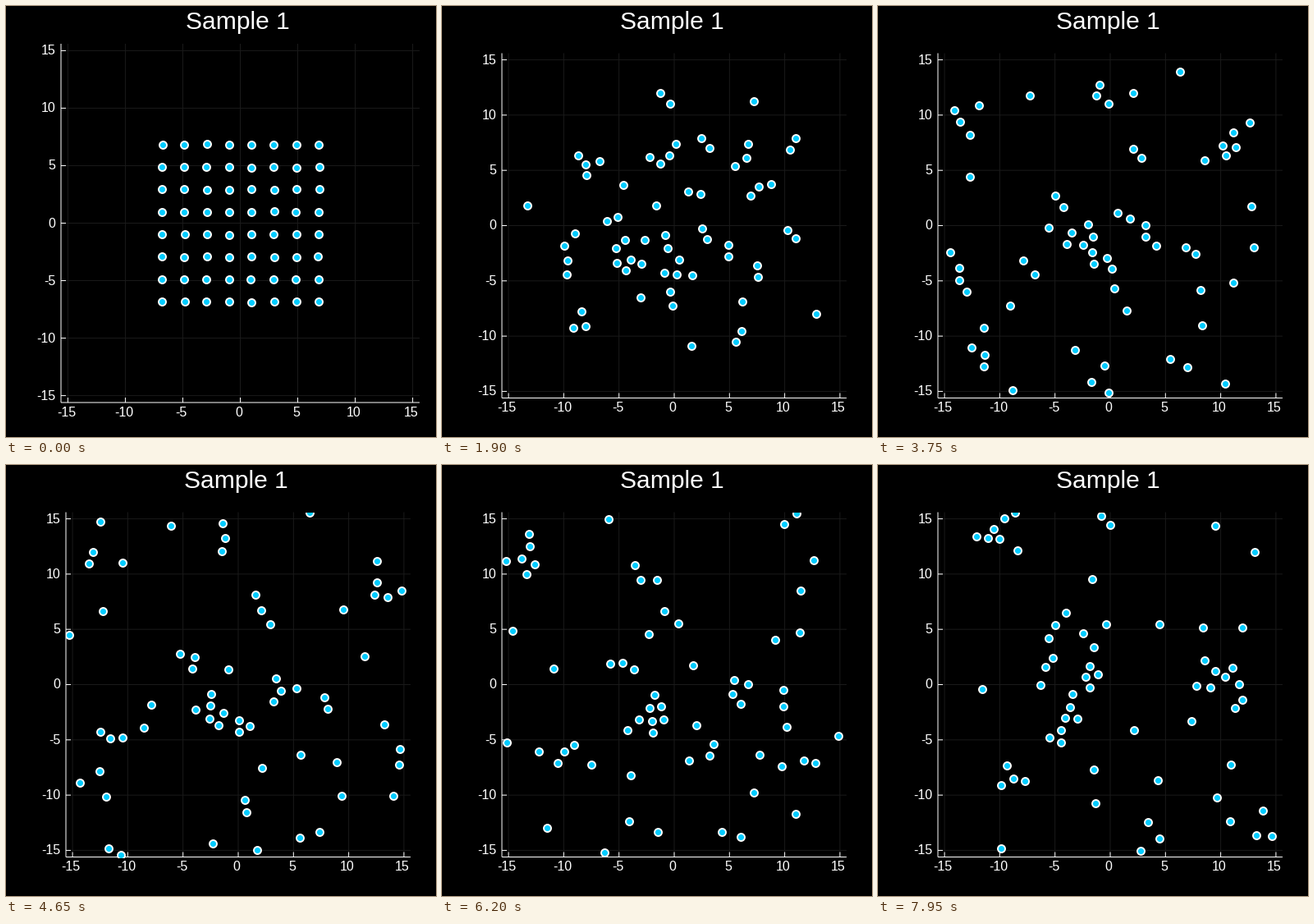
These frames come from a looping animation (524 px wide and 525 px high, 8000 ms). A matplotlib script:

```python
import numpy as np
import matplotlib.pyplot as plt
from matplotlib.animation import FuncAnimation
from matplotlib.patches import Rectangle

W, H, DPI = 524, 525, 100
PX = 72 / DPI
FRAMES, INTERVAL = 160, 50

# Lennard-Jones gas in reduced units, in a periodic box
N_SIDE = 8
SPACING = 1.95
BOX = 2 * N_SIDE * SPACING
HALF = BOX / 2
JITTER = 0.025
SPEED = 0.45
PACE = 4.0              # reduced time per second
SUBSTEPS = 20
SEED = 11


def lattice():
    k = (np.arange(N_SIDE) - (N_SIDE - 1) / 2) * SPACING
    gx, gy = np.meshgrid(k, k)
    return np.column_stack([gx.ravel(), gy.ravel()])


def forces(p):
    d = p[:, None] - p[None]
    d -= BOX * np.round(d / BOX)
    r2 = (d ** 2).sum(axis=2)
    np.fill_diagonal(r2, np.inf)
    inv6 = r2 ** -3
    pull = 24 * (2 * inv6 ** 2 - inv6) / r2
    return (d * pull[..., None]).sum(axis=1)


def simulate():
    """Velocity Verlet; returns the positions at every frame."""
    rng = np.random.default_rng(SEED)
    p = lattice()
    p += rng.normal(0, JITTER, p.shape)
    v = rng.normal(0, SPEED, p.shape)
    v -= v.mean(axis=0)
    dt = PACE * INTERVAL / 1000 / SUBSTEPS
    f = forces(p)
    path = [p.copy()]
    for _ in range(FRAMES - 1):
        for _ in range(SUBSTEPS):
            v += f * dt / 2
            p += v * dt
            f = forces(p)
            v += f * dt / 2
        path.append((p + HALF) % BOX - HALF)
    return path


PATH = simulate()

fig = plt.figure(figsize=(W / DPI, H / DPI), dpi=DPI, facecolor="black")
ax = fig.add_axes([0, 0, 1, 1])
ax.set_xlim(-0.5, W - 0.5)
ax.set_ylim(H - 0.5, -0.5)
ax.axis("off")


class View:
    """Grid, axes and labels of one plot area, measured in pixels."""

    def __init__(self, x0, y0, side, title_x):
        self.x0, self.y1 = x0, y0 + side
        self.scale = side / BOX
        self.clip = Rectangle((x0, y0), side, side, transform=ax.transData)
        self.parts = []
        x1, y1 = x0 + side, y0 + side
        self.text(title_x, 28, "Sample 1", 30, "center")
        for v in range(-15, 16, 5):
            x, y = self.to_px(np.array([v, v]))
            self.line([x, x], [y0, y1], "#1a1a1a", 1)
            self.line([x0, x1], [y, y], "#1a1a1a", 1)
            self.line([x, x], [y1 - 6, y1], "white", 2)
            self.line([x0, x0 + 6], [y, y], "white", 2)
            self.text(x - 1.8, y1 + 17, str(v), 16, "center")
            self.text(x0 - 6.5, y + 5, str(v), 16, "right")
        self.line([x0, x0], [y0, y1], "white", 2)
        self.line([x0, x1], [y1, y1], "white", 2)

    def to_px(self, p):
        x = self.x0 + (p[..., 0] + HALF) * self.scale
        y = self.y1 - (p[..., 1] + HALF) * self.scale
        return np.stack([x, y], axis=-1)

    def line(self, xs, ys, color, z):
        self.parts += ax.plot(xs, ys, color=color, lw=PX, zorder=z,
                              solid_capstyle="butt", snap=False)

    def text(self, x, y, s, size, ha):
        self.parts.append(ax.text(x, y, s, color="white", fontsize=size * PX,
                                  ha=ha, va="baseline",
                                  family="Liberation Sans"))

    def show(self, on):
        for part in self.parts:
            part.set_visible(on)


# The plot area shrinks a little right after the opening frame.
opening = View(66.5, 45.5, 437, 282)
steady = View(72.5, 57, 420, 280)
dots = ax.scatter([], [], s=(9 * PX) ** 2, c="#00ccff", edgecolors="white",
                  linewidths=1.9 * PX, zorder=3)


def draw(n):
    view = opening if n == 0 else steady
    opening.show(n == 0)
    steady.show(n > 0)
    dots.set_offsets(view.to_px(PATH[n]))
    dots.set_clip_path(view.clip)
    return [dots]


anim = FuncAnimation(fig, draw, frames=FRAMES, interval=INTERVAL, repeat=True,
                     repeat_delay=0, blit=False)
plt.show()
```
